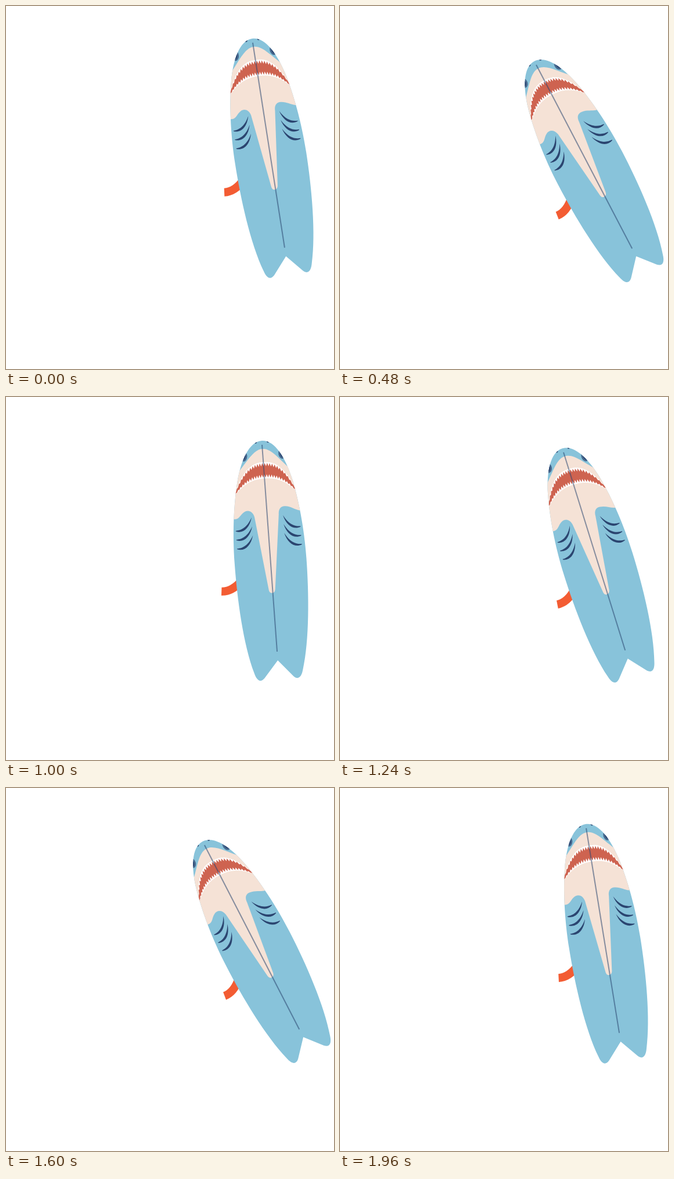
An HTML page with a canvas for the animation above (2 s loop, 565 px wide and 623 px high).

```html
<!DOCTYPE html>
<html lang="en">
<head>
<meta charset="utf-8">
<title>Shark surfboard</title>
<style>
  html, body { margin: 0; width: 100%; height: 100%; overflow: hidden; background: #fff; }
  canvas { display: block; width: 565px; height: 623px; }
</style>
</head>
<body>
<canvas id="stage" width="565" height="623"></canvas>
<script>
const ctx = document.getElementById('stage').getContext('2d');
const LOOP = 2000, STEP = 40, PIVOT = 250;
const BLUE = '#88c3da', CREAM = '#f5e2d6', RED = '#ce6350', NAVY = '#2b4570', ORANGE = '#f35c33';

// Motion keys: [time in ms, value], periodic over LOOP.
const posX = track([[0, 463.6], [240, 459], [480, 454], [560, 453], [760, 457.9], [1000, 459.3],
  [1240, 459.6], [1480, 454.5], [1600, 456.6], [1680, 459.5], [1960, 464.1]]);
const posY = track([[0, 310], [260, 348], [480, 322.4], [570, 303], [760, 337.3], [870, 355],
  [1000, 331.3], [1050, 324], [1120, 334], [1175, 337], [1240, 333.6], [1460, 312],
  [1600, 320.1], [1730, 330], [1960, 315.8]]);
const tilt = track([[0, 8.88], [240, 18.5], [425, 28.6], [480, 27.65], [560, 26.1], [760, 16],
  [1000, 4.19], [1240, 17.36], [1480, 29.8], [1600, 27.3], [1680, 23.2], [1960, 9.22]]);

// Smooth periodic curve, level at its high and low keys.
function track(keys) {
  const n = keys.length;
  const key = i => {
    const turn = Math.floor(i / n), k = keys[i - turn * n];
    return [k[0] + turn * LOOP, k[1]];
  };
  const rate = i => {
    const [a, b] = [key(i), key(i + 1)];
    return (b[1] - a[1]) / (b[0] - a[0]);
  };
  const slope = i => {
    const before = rate(i - 1), after = rate(i);
    if (before * after <= 0) return 0;
    const h0 = key(i)[0] - key(i - 1)[0], h1 = key(i + 1)[0] - key(i)[0];
    return (before * h1 + after * h0) / (h0 + h1);
  };
  return t => {
    let i = n - 1;
    while (keys[i][0] > t) i--;
    const [t0, a] = key(i), [t1, b] = key(i + 1);
    const h = t1 - t0, s = (t - t0) / h, r = 1 - s;
    return a * r * r * (1 + 2 * s) + b * s * s * (3 - 2 * s)
      + h * s * r * (slope(i) * r - slope(i + 1) * s);
  };
}

// Board space: x across, y along the stringer from nose to tail.
const outline = new Path2D(`M0,-7 C22,-7 38,24 47,60 C56,98 62,148 62,200
  C62,262 57,340 42,390 C39,402 33,408 25,400 L0,371 L-25,400
  C-33,408 -39,402 -42,390 C-57,340 -62,262 -62,200
  C-62,148 -56,98 -47,60 C-38,24 -22,-7 0,-7Z`);
const belly = new Path2D(`M-48,48 C-28,28 -16,7 0,7 C16,7 28,28 48,47 L75,47 L75,117 L56,117
  C48,115 42,109 32,108 C24,107 20,113 20,121 L4.5,249 Q3.5,255 -1.5,255 Q-5.5,255 -6.5,250
  L-22,123 C-24,112 -33,109 -39,113 C-46,117 -48,124 -55,124 L-75,124 L-75,48Z`);
const gill = new Path2D('M56,144 C46,144 36,140 27,123 C32,142 44,150 56,145Z');
const fin = new Path2D('M-88,246 Q-70,248 -52,230');

const HALF = 53;
const lip = (x, mid, end, p) => mid + (end - mid) * Math.pow(Math.abs(x) / HALF, p);
const upper = x => lip(x, 30, 82, 2.5);
const lower = x => lip(x, 58, 83, 2.3);

// Mouth shape; bite is the tooth depth, zero gives smooth lips.
function mouth(bite) {
  const path = new Path2D(), count = 50;
  const at = i => -HALF + 2 * HALF * i / count;
  const depth = (i, x) => (i % 2 ? 1 : 0.2) * bite * (1 - Math.pow(Math.abs(x) / HALF, 3));
  for (let i = 0; i <= count; i++) path.lineTo(at(i), upper(at(i)) + depth(i, at(i)));
  for (let i = count; i >= 0; i--) path.lineTo(at(i), lower(at(i)) - depth(i + 1 - count / 2 % 2, at(i)));
  path.closePath();
  return path;
}
const teeth = mouth(0), throat = mouth(7);

function fill(path, color) {
  ctx.fillStyle = color;
  ctx.fill(path);
}

function oval(x, y, rx, ry, angle, color) {
  ctx.beginPath();
  ctx.ellipse(x, y, rx, ry, angle, 0, Math.PI * 2);
  ctx.fillStyle = color;
  ctx.fill();
}

function drawBoard() {
  ctx.strokeStyle = ORANGE;
  ctx.lineWidth = 14;
  ctx.stroke(fin);

  fill(outline, BLUE);
  ctx.save();
  ctx.clip(outline);
  fill(belly, CREAM);
  fill(teeth, '#fff');
  fill(throat, RED);
  for (const side of [-1, 1]) {
    ctx.save();
    ctx.scale(side, 1);
    oval(33, 18, 6, 8.5, -0.15, '#47698f');
    oval(34, 18, 4, 6, -0.15, NAVY);
    oval(10.5, -4.6, 2, 1.6, 0.4, NAVY);
    for (let i = 0; i < 3; i++) {
      fill(gill, NAVY);
      ctx.translate(0, 15.3);
    }
    ctx.restore();
  }
  ctx.restore();

  ctx.beginPath();
  ctx.moveTo(0, 0);
  ctx.lineTo(0, 356);
  ctx.strokeStyle = 'rgba(43,69,112,0.55)';
  ctx.lineWidth = 2;
  ctx.stroke();
}

function frame(now) {
  const t = Math.floor((now % LOOP) / STEP) * STEP;
  ctx.fillStyle = '#fff';
  ctx.fillRect(0, 0, 565, 623);
  ctx.save();
  ctx.translate(posX(t), posY(t));
  ctx.rotate(-tilt(t) * Math.PI / 180);
  ctx.translate(0, -PIVOT);
  drawBoard();
  ctx.restore();
}

let start;
function tick(now) {
  if (start === undefined) start = now;
  frame(Math.max(0, now - start));
  requestAnimationFrame(tick);
}
frame(0);
requestAnimationFrame(tick);
</script>
</body>
</html>
```
